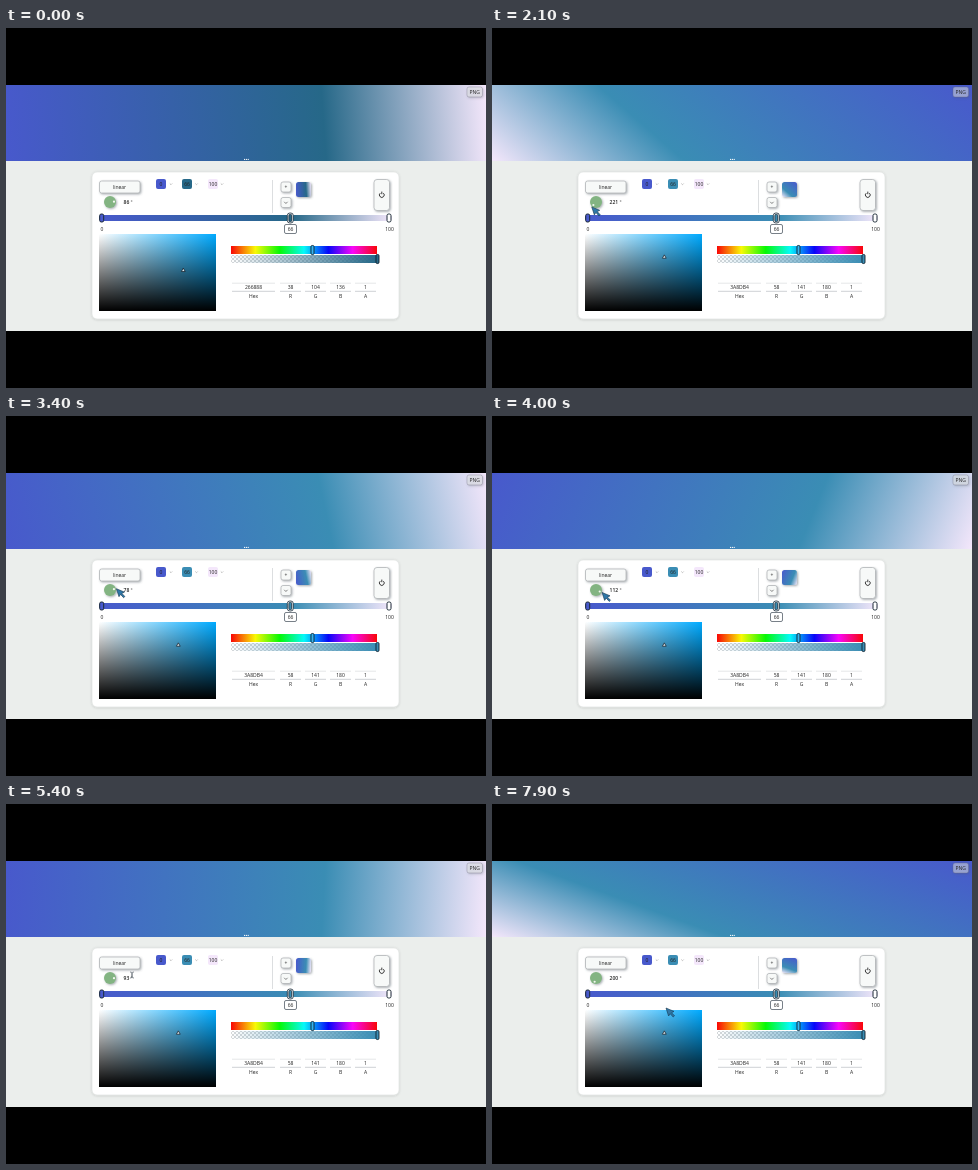
An HTML page that plays this animation: 480x360 px, repeating every 8 s.

```html
<!DOCTYPE html>
<html lang="en">
<head>
<meta charset="utf-8">
<title>Gradient editor</title>
<style>
  html, body { margin: 0; width: 100%; height: 100%; overflow: hidden; background: #000; }
  svg { display: block; width: 100vw; height: 100vh; }
  text { font-family: "Open Sans", "Noto Sans", sans-serif; font-size: 5px; fill: #222; text-anchor: middle; }
</style>
</head>
<body>
<svg id="stage" viewBox="0 0 480 360"></svg>
<script>
const stage = document.getElementById('stage');
const LOOP = 8000;
const START = '#4859cc', END = '#f4e7fb', MID = 0.66;
const BAND = { x: 0, y: 57, w: 480, h: 76 };
const CHIP = { x: 290, y: 154, w: 15, h: 15 };
const PAD = { x: 93, y: 206, w: 117, h: 77 };
const KNOB = { x: 104, y: 174 };
const HUE_COLOR = 'hsl(200,100%,50%)';

// ---------- static markup ----------
const box = (x, y, w, h, r, attrs) =>
  `<rect x="${x}" y="${y}" width="${w}" height="${h}" rx="${r}" ${attrs}/>`;
const area = (a, r, attrs) => box(a.x, a.y, a.w, a.h, r, attrs);
const label = (x, y, s, attrs = '') => `<text x="${x}" y="${y}" ${attrs}>${s}</text>`;
const stop = (at, color, attrs = '') => `<stop offset="${at}" stop-color="${color}" ${attrs}/>`;
const ramp = (id, attrs, stops) => `<linearGradient id="${id}" ${attrs}>${stops}</linearGradient>`;
const line = (d, color, width = 0.6) =>
  `<path d="${d}" fill="none" stroke="${color}" stroke-width="${width}"/>`;
const button = (x, y, w, h, r = 2) =>
  box(x, y, w, h, r, 'fill="#f7f9f8" stroke="#a9adb0" stroke-width=".7" filter="url(#soft)"');
const grip = (x, y, h, fill = '#fff') =>
  box(x - 2, y, 4, h, 1.6, `fill="${fill}" stroke="#1c2a36" stroke-width="1"`);
const caret = x => line(`M${x - 1.2} 155.5l1.2 1.2 1.2-1.2`, '#999');

const threeStops = stop(0, START) + stop(MID, START, 'class="mid"') + stop(1, END);
const rainbow = [0, 1, 2, 3, 4, 5, 6]
  .map(i => stop(i / 6, `hsl(${i * 60},95%,50%)`)).join('');

const defs = `<defs>
  ${ramp('bandFill', 'gradientUnits="userSpaceOnUse"', threeStops)}
  ${ramp('chipFill', 'gradientUnits="userSpaceOnUse"', threeStops)}
  ${ramp('railFill', '', threeStops)}
  ${ramp('hueFill', '', rainbow)}
  ${ramp('satFill', '', stop(0, '#fff') + stop(1, HUE_COLOR))}
  ${ramp('valFill', 'x2="0" y2="1"', stop(0, '#000', 'stop-opacity="0"') + stop(1, '#000'))}
  ${ramp('alphaFill', '', stop(0, START, 'class="mid" stop-opacity="0"') + stop(1, START, 'class="mid"'))}
  <pattern id="checks" width="4" height="4" patternUnits="userSpaceOnUse">
    <path d="M0 0h4v4h-4z" fill="#fff"/><path d="M0 0h2v4h2v-2h-4z" fill="#d5d8da"/>
  </pattern>
  <filter id="soft" x="-40%" y="-40%" width="190%" height="190%">
    <feDropShadow dx="1" dy="1" stdDeviation="1" flood-color="#4a5560" flood-opacity=".5"/>
  </filter>
  <filter id="lift" x="-5%" y="-5%" width="110%" height="112%">
    <feDropShadow dx="0" dy=".5" stdDeviation="1" flood-opacity=".18"/>
  </filter>
</defs>`;

const swatches = box(150, 151, 10, 10, 2, `fill="${START}"`) + label(155, 157.8, '0') + caret(165)
  + box(176, 151, 10, 10, 2, `fill="${START}" class="midFill"`) + label(181, 157.8, '66') + caret(190.5)
  + box(202, 151, 10, 10, 2, `fill="${END}"`) + label(207, 157.8, '100') + caret(216);

const tools = line('M266.5 152v33', '#d3d6d8', 0.8)
  + button(275, 154, 10, 10) + label(280, 160.9, '+')
  + button(275, 169.5, 10, 10) + line('M278.2 173.8l1.7 1.7 1.7-1.7', '#333')
  + area(CHIP, 2.5, 'fill="url(#chipFill)" filter="url(#soft)"')
  + button(368, 151.5, 15.5, 31, 3)
  + line('M374.2 165.2a2.4 2.4 0 1 0 3.2 0M375.8 163.6v2.6', '#222', 0.9);

const rail = box(93, 187, 293, 6, 3, 'fill="url(#railFill)"')
  + grip(95.7, 186, 8, START)
  + box(281.3, 185, 6, 10, 2.5, 'fill="#e9f1f5" stroke="#1c2a36" stroke-width=".8"')
  + box(282.9, 186.4, 2.8, 7.2, 1.2, 'fill="#777" class="midFill" stroke="#1c2a36" stroke-width=".8"')
  + grip(383, 186, 8)
  + label(96, 202.6, '0') + label(383.5, 202.6, '100')
  + box(278.5, 196.5, 12, 9, 1.5, 'fill="#fff" stroke="#56606a" stroke-width=".8"')
  + label(284.5, 203, '66');

const picker = area(PAD, 0, 'fill="url(#satFill)"') + area(PAD, 0, 'fill="url(#valFill)"')
  + '<path id="pin" d="M0-1.8L1.9 1.6H-1.9z" fill="#dfe9ee" stroke="#101820" stroke-width=".7"/>'
  + box(225, 218, 146, 8, 0, 'fill="url(#hueFill)"')
  + box(225, 227, 146, 8, 0, 'fill="url(#checks)"')
  + box(225, 227, 146, 8, 0, 'fill="url(#alphaFill)"')
  + box(305, 217.5, 3, 9, 1.2, 'fill="#35b4f0" stroke="#10202c" stroke-width=".9"')
  + box(370, 226.5, 3, 9, 1.2, 'fill="#fff" class="midFill" stroke="#10202c" stroke-width=".9"');

const fields = [['Hex', 226, 43], ['R', 274, 21], ['G', 299, 21], ['B', 324, 21], ['A', 349, 21]]
  .map(([name, x, w]) => {
    const c = x + w / 2;
    return line(`M${x} 255.2h${w}`, '#d4d7d9') + line(`M${x} 263.3h${w}`, '#aeb3b7')
      + label(c, 261.2, '1', `id="val${name}"`) + label(c, 269.8, name);
  }).join('');

const dial = `<circle cx="${KNOB.x}" cy="${KNOB.y}" r="6" fill="#83b482" filter="url(#soft)"/>
  <circle id="dot" r="1.1" fill="#f2f8f0"/>
  <g id="editor">
    ${box(116.5, 170.5, 10, 7.5, 1.5, 'fill="#fff" stroke="#111" stroke-width="1"')}
    <rect id="selection" x="118" y="171.6" width="7.4" height="5.3" fill="#2468c8"/>
  </g>
  ${label(117.6, 176.2, '', 'id="angle" style="text-anchor:start;font-weight:600"')}
  ${label(127.5, 176.2, '°', 'id="degree"')}`;

const pointers = `<path id="arrow" d="M0 0L2.6 8 4.2 5.7 7.2 9 8.5 7.8 5.5 4.7 8 3.4z"
    fill="#2f78a8" stroke="#17344c" stroke-width=".6"/>
  <path id="beam" d="M-2-3q2 0 2 1v4q0 1-2 1M2-3q-2 0-2 1v4q0 1 2 1" fill="none" stroke="#59646c" stroke-width=".7"/>`;

stage.innerHTML = defs
  + box(0, 0, 480, 360, 0, 'fill="#000"')
  + box(0, 133, 480, 170, 0, 'fill="#ebeeec"')
  + area(BAND, 0, 'fill="url(#bandFill)"')
  + [238.6, 240.4, 242.2].map(x => `<circle cx="${x}" cy="131.4" r=".6" fill="#fff"/>`).join('')
  + box(461, 59, 15.5, 10, 2, 'fill="#e6eceb" fill-opacity=".45" stroke="#667" stroke-opacity=".45" stroke-width=".7" filter="url(#soft)"')
  + label(468.7, 66, 'PNG')
  + box(86, 144, 307, 147, 5, 'fill="#fff" stroke="#dcdfde" stroke-width=".6" filter="url(#lift)"')
  + button(93.5, 153, 40.5, 12) + label(113.5, 161, 'linear')
  + swatches + tools + rail + picker + fields + dial + pointers;

// ---------- motion ----------
const $ = id => document.getElementById(id);
const mids = stage.querySelectorAll('.mid');
const midFills = stage.querySelectorAll('.midFill');
const HOLDS = [500, 1700, 2600, 3500, 4600, 5600, 6600, 6800, 7600];

// Values between [time, value] keys, eased in and out.
function track(t, keys) {
  if (t <= keys[0][0]) return keys[0][1];
  for (let i = 1; i < keys.length; i++) {
    const [t0, v0] = keys[i - 1], [t1, v1] = keys[i];
    if (t <= t1) {
      const u = (t - t0) / (t1 - t0);
      return v0 + (v1 - v0) * u * u * (3 - 2 * u);
    }
  }
  return keys[keys.length - 1][1];
}

const dragged = t => track(t, [[1400, 86], [2100, 221], [2900, 413], [4000, 472], [5000, 453]]);

function angleAt(t) {
  if (t >= 7300) return 200;
  if (t >= 7100) return 20;
  if (t >= 6900) return 2;
  return Math.round(dragged(t)) % 360;
}

function heading(deg) {
  const a = deg * Math.PI / 180;
  return [Math.sin(a), -Math.cos(a)];
}

function aim(id, a, deg) {
  const [dx, dy] = heading(deg);
  const half = (Math.abs(a.w * dx) + Math.abs(a.h * dy)) / 2;
  const cx = a.x + a.w / 2, cy = a.y + a.h / 2;
  set(id, { x1: cx - dx * half, y1: cy - dy * half, x2: cx + dx * half, y2: cy + dy * half });
}

function set(id, attrs) {
  for (const k in attrs) $(id).setAttribute(k, attrs[k]);
}
const place = (id, x, y) => set(id, { transform: `translate(${x} ${y})` });
const show = (id, on) => set(id, { visibility: on ? 'visible' : 'hidden' });

function pointerAt(t) {
  const [dx, dy] = heading(dragged(t));
  const grab = [KNOB.x + dx * 6.5, KNOB.y + dy * 6.5];
  if (t < 1500) return [track(t, [[500, 172], [1400, grab[0]]]), track(t, [[500, 228], [1400, grab[1]]])];
  if (t < 5000) return grab;
  return [track(t, [[5000, grab[0]], [5400, 126], [5900, 126], [6500, 174]]),
          track(t, [[5000, grab[1]], [5400, 171], [5900, 171], [6500, 204]])];
}

function draw(now) {
  let t = Math.floor((now % LOOP) / 100) * 100;
  if (HOLDS.includes(t)) t -= 100;

  const drag = track(t, [[0, 0], [400, 1]]);
  const rgb = [[38, 58], [104, 141], [136, 180]].map(([a, b]) => Math.round(a + (b - a) * drag));
  const color = `rgb(${rgb})`;
  mids.forEach(el => el.setAttribute('stop-color', color));
  midFills.forEach(el => el.setAttribute('fill', color));

  const high = Math.max(...rgb), low = Math.min(...rgb);
  place('pin', PAD.x + PAD.w * (1 - low / high), PAD.y + PAD.h * (1 - high / 255));
  $('valHex').textContent = rgb.map(v => v.toString(16).padStart(2, '0')).join('').toUpperCase();
  ['R', 'G', 'B'].forEach((name, i) => { $('val' + name).textContent = rgb[i]; });

  const deg = angleAt(t);
  aim('bandFill', BAND, deg);
  aim('chipFill', CHIP, deg);
  const [dx, dy] = heading(deg);
  place('dot', KNOB.x + dx * 4, KNOB.y + dy * 4);

  const editing = t >= 5800 && t < 7700;
  const selected = editing && t < 6900;
  show('editor', editing);
  show('selection', selected);
  $('angle').textContent = deg;
  $('angle').style.fill = selected ? '#fff' : '#222';
  const digits = String(deg).length;
  set('degree', { x: editing ? 128.3 : 117.6 + digits * 2.9 + 2.2 });

  const typing = t >= 5300 && t < 6000;
  const [px, py] = pointerAt(t);
  show('arrow', t >= 500 && !typing);
  show('beam', typing);
  place('arrow', px, py);
  place('beam', px, py);
}

const begin = performance.now();
function loop() {
  draw(performance.now() - begin);
  requestAnimationFrame(loop);
}
loop();
</script>
</body>
</html>
```
